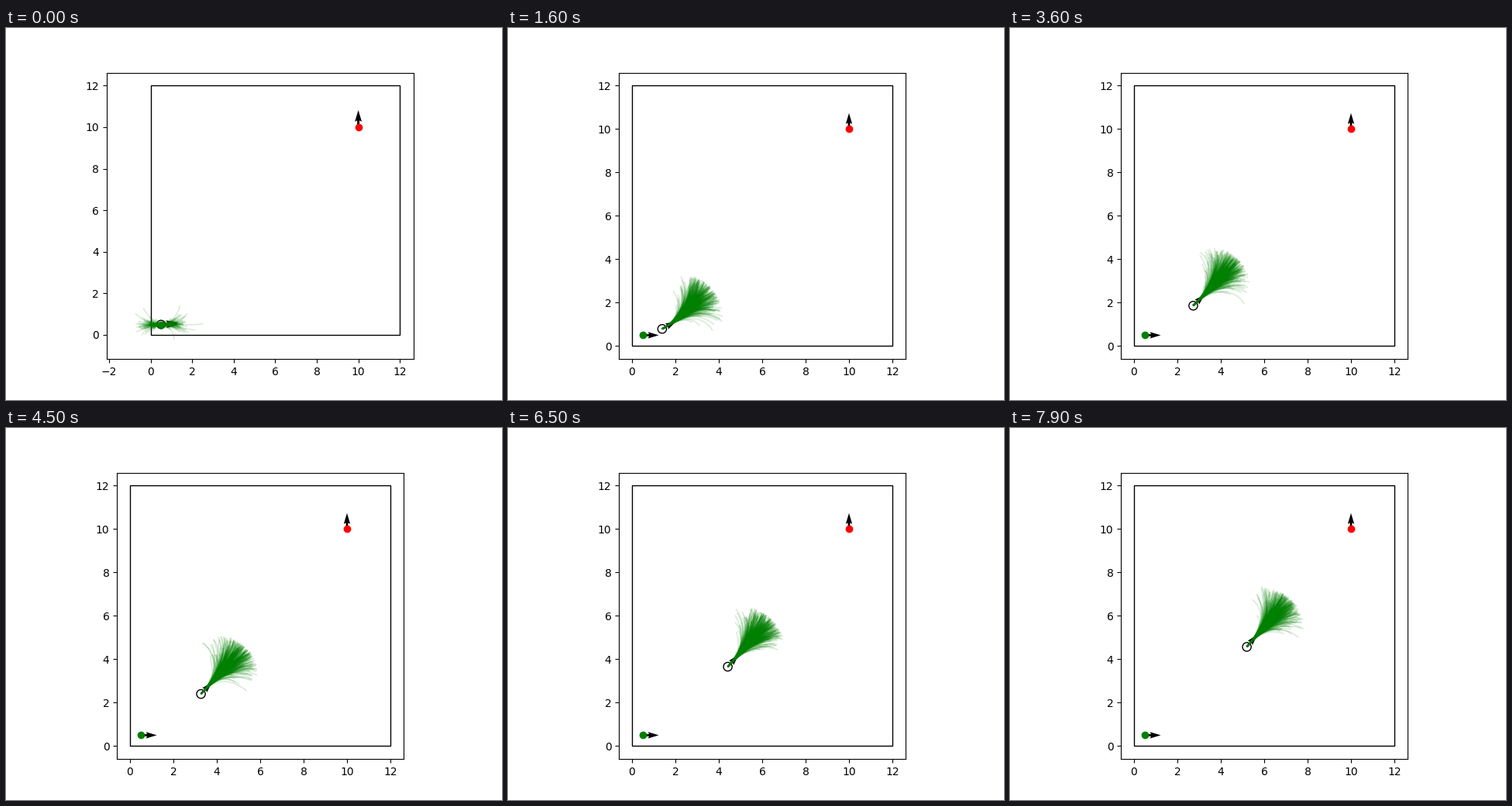
A matplotlib script for the animation above (8 s loop, 640x480 px).

```python
import numpy as np
import matplotlib.pyplot as plt
from matplotlib.animation import FuncAnimation
from matplotlib.collections import LineCollection
from matplotlib.patches import Circle, Rectangle
from matplotlib.ticker import MultipleLocator

FRAMES, INTERVAL = 80, 100
SIZE = 12
START, GOAL = (0.5, 0.5), (10, 10)
HORIZON, DT, V_MAX = 30, 0.1, 1.0
SAMPLES = 500
V_STEP, W_STEP = 0.058, 0.053  # random-walk step of speed and turn rate

# Way points of the robot: step, x, y
KNOTS = np.array([
    (0, 0.50, 0.50), (5, 0.65, 0.52), (16, 1.39, 0.79), (27, 2.15, 1.31),
    (36, 2.73, 1.86), (45, 3.27, 2.40), (54, 3.78, 2.96), (63, 4.30, 3.53),
    (72, 4.81, 4.10), (79, 5.20, 4.57), (110, 6.95, 6.56)])
STEPS, POINTS = KNOTS[:, 0], KNOTS[:, 1:]
SLOPES = np.gradient(POINTS, STEPS, axis=0)


def position(n):
    """Cubic Hermite curve through the way points."""
    n = np.asarray(n, float)
    i = np.clip(np.searchsorted(STEPS, n, side="right") - 1, 0, len(STEPS) - 2)
    h = (STEPS[i + 1] - STEPS[i])[:, None]
    u = (n - STEPS[i])[:, None] / h
    return ((1 + 2 * u) * (1 - u)**2 * POINTS[i]
            + u * (1 - u)**2 * h * SLOPES[i]
            + u**2 * (3 - 2 * u) * POINTS[i + 1]
            + u**2 * (u - 1) * h * SLOPES[i + 1])


def rollouts(n, origin, speed, heading):
    """Noisy trajectories scattered around the planned motion."""
    rng = np.random.default_rng(100 + n)
    shape = (SAMPLES, HORIZON)
    gain = min(1, n / 4)
    dv = np.cumsum(rng.normal(0, V_STEP, shape), axis=1)
    dw = np.cumsum(rng.normal(0, W_STEP, shape), axis=1)
    v = np.clip(gain * speed + dv, -V_MAX, V_MAX)
    th = gain * heading + np.cumsum(dw, axis=1) * DT
    steps = np.stack([v * np.cos(th), v * np.sin(th)], axis=2) * DT
    paths = np.zeros((SAMPLES, HORIZON + 1, 2))
    paths[:, 1:] = np.cumsum(steps, axis=1)
    return paths + origin


def pose(xy, angle, color):
    ax.plot(*xy, "o", color=color)
    ax.quiver(*xy, np.cos(angle), np.sin(angle))


def set_view(n):
    x_lo = np.interp(n, [0, 3], [-1.45, 0])
    y_lo = np.interp(n, [0, 3, 5, 12], [-0.54, -0.95, -0.88, 0])
    for lo, set_lim in ((x_lo, ax.set_xlim), (y_lo, ax.set_ylim)):
        pad = 0.05 * (SIZE - lo)
        set_lim(lo - pad, SIZE + pad)
    ax.set_aspect("equal")
    ax.xaxis.set_major_locator(MultipleLocator(2))
    ax.yaxis.set_major_locator(MultipleLocator(2))


def draw(n):
    ax.clear()
    plan = position(n + np.arange(HORIZON + 1))
    move = np.diff(plan, axis=0)
    speed = np.hypot(*move.T) / DT
    heading = np.arctan2(move[:, 1], move[:, 0])
    robot = plan[0]

    ax.add_patch(Rectangle((0, 0), SIZE, SIZE, fill=False))
    pose(START, 0, "green")
    pose(GOAL, np.pi / 2, "red")
    ax.add_patch(Circle(robot, 0.2, fill=False))
    ax.quiver(*robot, np.cos(heading[0]), np.sin(heading[0]))
    ax.add_collection(LineCollection(
        rollouts(n, robot, speed, heading),
        colors="green", alpha=0.15, linewidths=1.2, zorder=2))
    set_view(n)


fig, ax = plt.subplots(figsize=(6.4, 4.8), dpi=100)
anim = FuncAnimation(fig, draw, frames=FRAMES, interval=INTERVAL,
                     init_func=lambda: None, repeat=True, repeat_delay=0)
plt.show()
```
